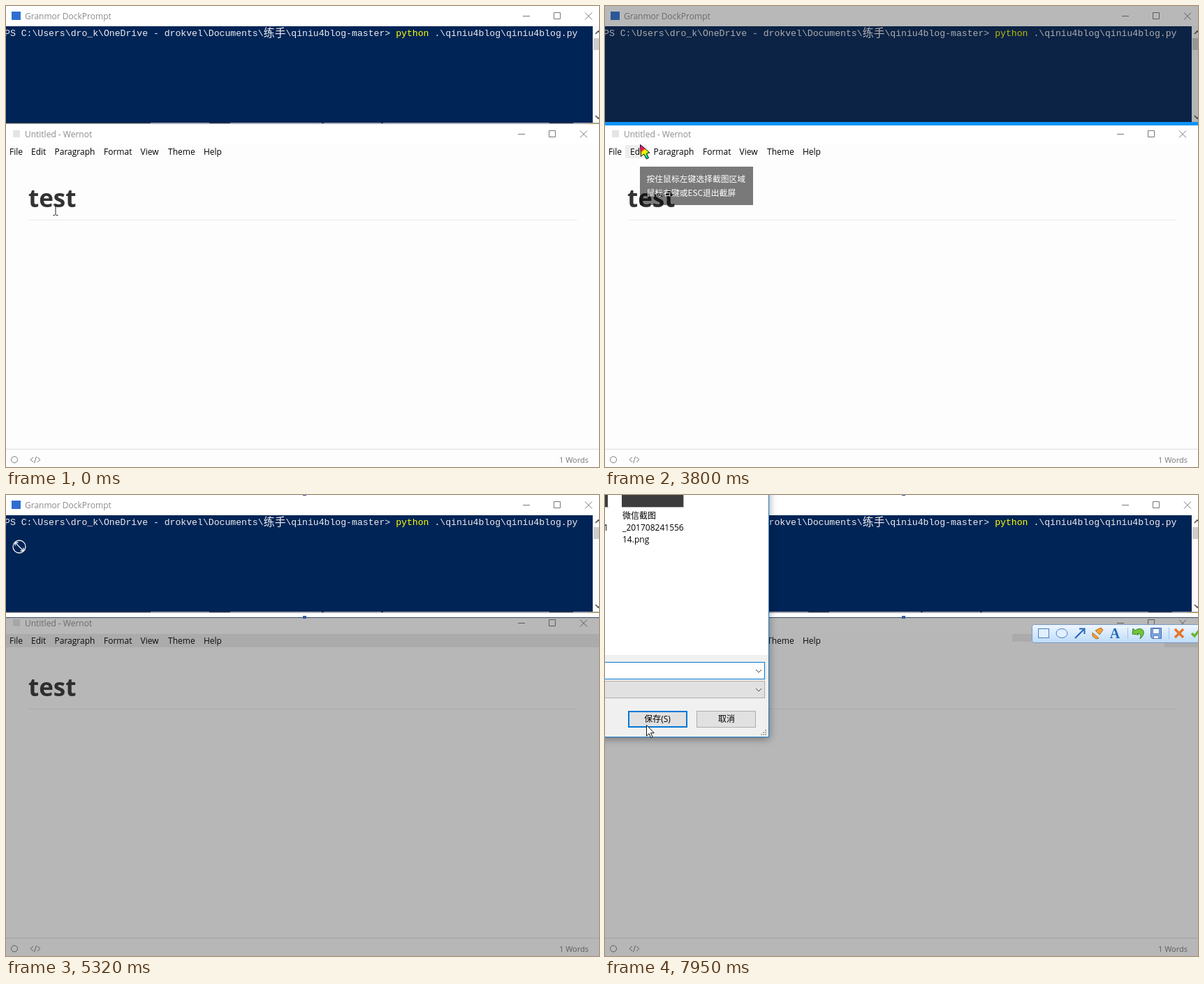
An HTML page for the animation above (8 s loop, 849 by 660 pixels).

```html
<!DOCTYPE html>
<html lang="en">
<head>
<meta charset="utf-8">
<title>Screenshot demo</title>
<style>
  html, body { margin: 0; width: 100%; height: 100%; overflow: hidden; background: #fdfdfd; }
  svg { display: block; }
  text { font: 12px "Open Sans", "Noto Sans CJK SC", sans-serif; white-space: pre; }
  .title { fill: #8c8c8c; }
  .term { font: 13.15px "Liberation Mono", monospace; fill: #eeedf0; }
  .term.cjk { font: 15.8px "Noto Sans CJK SC", sans-serif; font-weight: 300; }
  .term.cmd { fill: #ffff00; }
  .h1 { font-size: 35px; font-weight: 700; fill: #333; }
  .status { font-size: 11px; fill: #777; }
  .tip text { font: 11.8px "Noto Sans CJK SC", sans-serif; fill: #fff; }
  .dim { fill: rgba(35, 35, 35, .32); }
  .line { fill: none; stroke: #777; }
  .blue { fill: #0a93f5; }
  .dialog { filter: drop-shadow(0 2px 6px rgba(0, 0, 0, .4)); }
  .btn { fill: #e1e1e1; stroke: #adadad; }
  .mid { text-anchor: middle; }
</style>
</head>
<body>
<svg width="849" height="660" viewBox="0 0 849 660">
  <defs>
    <linearGradient id="bar" x2="0" y2="1">
      <stop stop-color="#eef6ff"/><stop offset="1" stop-color="#bedcfa"/>
    </linearGradient>
    <linearGradient id="rainbow" x1="0" y1="0" x2=".55" y2="1">
      <stop offset=".1" stop-color="#f0c"/><stop offset=".38" stop-color="#f22"/>
      <stop offset=".5" stop-color="#fe0"/><stop offset=".7" stop-color="#df0"/>
      <stop offset=".9" stop-color="#0d8"/>
    </linearGradient>
    <g id="controls" class="line">
      <path d="M0 .5H10M44.5 -4.5h9v9h-9zM89 -4.5l10 10M99 -4.5l-10 10"/>
    </g>
  </defs>

  <!-- terminal window -->
  <rect width="849" height="169" fill="#fff"/>
  <rect x="8" y="8" width="13" height="12" fill="#2f6fd0"/>
  <text class="title" x="27" y="18.5">Granmor DockPrompt</text>
  <use href="#controls" x="740" y="14"/>
  <rect y="29" width="840" height="138" fill="#012456"/>
  <g id="prompt"></g>
  <rect x="840" y="29" width="9" height="138" fill="#fafafa"/>
  <rect x="841" y="46" width="8" height="17" fill="#cdcdcd"/>
  <path d="M844 40l4-4 4 4M844 157l4 4 4-4" fill="none" stroke="#505050" stroke-width="1.6"/>
  <rect y="167" width="849" height="2" fill="#a5aab2"/>
  <path d="M0 167.5H207M291 167.5h30M452 167.5h3M537 167.5h3M778 167.5h34" stroke="#3b414b"/>
  <path d="M833 168.5h16" stroke="#b49b55"/>

  <!-- editor window -->
  <rect y="169" width="849" height="30" fill="#fff"/>
  <rect x="10" y="178" width="10" height="10" fill="#e4e4e4"/>
  <text class="title" x="27" y="187.5">Untitled - Wernot</text>
  <use href="#controls" x="733" y="183"/>
  <rect data-show="2560 4080" x="29" y="199" width="31" height="19" fill="#eee"/>
  <g id="menu"></g>
  <text class="h1" x="32" y="288">test</text>
  <path d="M32 306.5H818" stroke="#ececec"/>
  <path d="M0 634.5H849" stroke="#dcdcdc"/>
  <circle class="line" cx="12" cy="649.5" r="4.5"/>
  <path class="line" d="M39 646l-4 3.5 4 3.5M45 646l4 3.5-4 3.5M43.500 645l-3 9.500"/>
  <text class="status" x="792" y="654">1 Words</text>

  <!-- capture overlay -->
  <g data-show="3530 4080">
    <rect class="dim" width="849" height="168"/>
    <rect class="blue" y="166" width="849" height="5"/>
  </g>
  <g data-show="4080 8000">
    <rect class="dim" y="176" width="849" height="484"/>
    <rect data-show="4080 6730" y="199" width="849" height="19" fill="rgba(0,0,0,.065)"/>
    <path data-show="6730 8000" d="M583 199h29v11h-29zM801 199h48v19h-48z" fill="rgba(0,0,0,.065)"/>
  </g>
  <path data-show="4080 5040" class="blue" d="M0 0h849v2H0zM0 173h849v5H0z"/>
  <g data-show="5040 8000" fill="#35599a">
    <rect y="175" width="849" height="1" fill="#34496c"/>
    <path d="M425 173h5v4h-5zM425 0h5v1h-5z"/>
  </g>

  <!-- capture toolbar -->
  <g data-show="5460 8000">
    <rect x="611.5" y="185.500" width="245" height="26" rx="3" fill="url(#bar)" stroke="#7c98bd"/>
    <rect data-show="6320 6880" x="778.5" y="187.5" width="22" height="21" rx="2" fill="#c3d3ee" stroke="#8499c4"/>
    <path d="M748.5 190v16M807.5 190v16" stroke="#a5c2e4"/>
    <g fill="#e1efff" stroke="#4a7cc4">
      <rect x="620.5" y="191.500" width="15" height="13"/>
      <ellipse cx="654" cy="198" rx="8" ry="6.5"/>
    </g>
    <path d="M673 205l12-12M679 191.500h7.500v7.500" fill="none" stroke="#2266b8" stroke-width="2"/>
    <path d="M698 197l9 8-4 1-5-4zM702 194l6 6 5-7-3-3z" fill="#f4a136" stroke="#b36a20"/>
    <text class="mid" x="730" y="205" style="font:bold 20px 'Liberation Serif',serif" fill="#2667b4">A</text>
    <path d="M755 199l1-8 3 3c6-5 14-2 12 5q-1 4-5 7 3-8-4-8l2 2z" fill="#74c33b" stroke="#39852a"/>
    <g stroke="#486eae">
      <path d="M781.5 190.500h15v15h-13l-2-2z" fill="#7da5df"/>
      <path d="M784.5 191.500h9v7h-9zM785.5 201.500h7v4h-7z" fill="#f3f8ff" stroke-width=".7"/>
    </g>
    <path d="M816 192l12 12M828 192l-12 12" stroke="#e5752d" stroke-width="3.5"/>
    <path d="M840 198l4 4 8-10" fill="none" stroke="#67b52f" stroke-width="3.5"/>
  </g>

  <!-- save dialog -->
  <g class="dialog" data-show="6730 8000">
    <rect x="-20" y="-20" width="254.500" height="366.500" fill="#fff" stroke="#1979ca"/>
    <rect x="-20" y="229" width="254" height="117" fill="#f0f0f0"/>
    <path d="M0 0h4v17H0zM24 0h88v17H24z" fill="#3c3c3c"/>
    <path d="M0 17.500h5M24 17.500h89M112.500 0v17" stroke="#b5b5b5"/>
    <text x="25" y="34">微信截图</text>
    <text x="25" y="51">_201708241556</text>
    <text x="25" y="68">14.png</text>
    <text x="-2" y="51">1</text>
    <rect x="-5.5" y="239.500" width="234" height="24" fill="#fff" stroke="#0078d7"/>
    <rect class="btn" x="-5.5" y="266.500" width="234" height="24"/>
    <rect data-show="7000 7680" x="-5.5" y="266.500" width="234" height="24" fill="#e5f1fb" stroke="#0078d7"/>
    <path d="M216 250l4 4 4-4M216 277l4 4 4-4" fill="none" stroke="#444"/>
    <rect x="34" y="310" width="83" height="22" fill="#e1e1e1" stroke="#0078d7" stroke-width="2"/>
    <rect class="btn" x="131.500" y="309.500" width="84" height="23"/>
    <text class="mid" x="75" y="325">保存(S)</text>
    <text class="mid" x="174" y="325">取消</text>
    <path d="M229 337h2M226 340h5M223 343h8" stroke="#b0b0b0" stroke-width="2" stroke-dasharray="2 1"/>
  </g>

  <!-- pointers -->
  <g id="pointer">
    <g data-kind="beam">
      <path d="M-3.500 -7.500h2.500l1 1 1-1h2.500M0 -6.500v13M-3.500 7.500h2.500l1-1 1 1h2.500" fill="none" stroke="#222"/>
    </g>
    <path data-kind="arrow" d="M.5 .5v15.500l3.600-3.400 2.800 6 2.300-1-2.700-5.900h4.800z" fill="#fff" stroke="#111"/>
    <g data-kind="rainbow">
      <path d="M.5 .5l1 17 4-3.500 4 7 3-1.500-3-6.500 4.500-1z" fill="url(#rainbow)" stroke="#111"/>
      <g class="tip">
        <rect y="32" width="162" height="55" fill="rgba(0,0,0,.52)"/>
        <text x="9.500" y="54">按住鼠标左键选择截图区域</text>
        <text x="9.500" y="74">鼠标右键或ESC退出截屏</text>
      </g>
    </g>
    <g data-kind="circle" fill="none" stroke="#f4f4f4" stroke-width="1.3">
      <circle r="9"/>
      <path d="M-5.500 -5.500l11 11M-6 -1.500v-4.500h4.500M6 1.500v4.500h-4.500"/>
    </g>
  </g>
</svg>

<script>
const LOOP = 8000;
const $ = id => document.getElementById(id);

function addText(parent, x, y, string, className = '') {
  const node = document.createElementNS(parent.namespaceURI, 'text');
  node.setAttribute('x', x);
  node.setAttribute('y', y);
  node.setAttribute('class', className);
  node.textContent = string;
  parent.append(node);
}

// Terminal runs, placed by column
const column = n => -2 + n * 7.89;
[
  [0, 'PS C:\\Users\\dro_k\\OneDrive - drokvel\\Documents\\', ''],
  [47, '练手', 'cjk'],
  [51, '\\qiniu4blog-master>', ''],
  [71, 'python', 'cmd'],
  [78, '.\\qiniu4blog\\qiniu4blog.py', '']
].forEach(([col, run, kind]) => addText($('prompt'), column(col), kind === 'cjk' ? 44 : 43, run, 'term ' + kind));

Object.entries({ File: 5, Edit: 36, Paragraph: 69.5, Format: 140, View: 192.5, Theme: 232, Help: 283 })
  .forEach(([label, x]) => addText($('menu'), x, 213, label));

// Pointer steps: start time, x, y, and a shape when it changes
const steps = [
  [0, 71, 292, 'beam'], [120, 79, 292], [240, 87, 292],
  [1240, 92, 300], [1370, 107, 317], [1500, 113, 326], [1630, 105, 310],
  [1760, 88, 280], [1890, 70, 250], [2020, 52, 214, 'arrow'], [2150, 36, 184], [2280, 24, 164],
  [2430, 30, 178], [2560, 38, 188], [2690, 45, 196], [2820, 48, 198], [3250, 49, 198],
  [3530, 50, 198, 'rainbow'], [3950, 49, 186], [4080, 46, 165], [4200, 42, 148],
  [4330, 36, 127], [4460, 33, 113], [4610, 28, 98], [4750, 22, 84], [4900, 19, 74],
  [5040, 19, 74, 'circle'], [5760, 70, 84], [5900, 260, 112], [6040, 480, 142],
  [6180, 680, 164], [6320, 783, 198, 'arrow'], [6460, 789, 202],
  [6880, 500, 240], [7000, 170, 274], [7680, 120, 300], [7810, 82, 318], [7950, 59, 329]
];
steps.forEach((step, i) => step[3] ??= steps[i - 1][3]);

const timed = [...document.querySelectorAll('[data-show]')]
  .map(node => [node, ...node.dataset.show.split(' ').map(Number)]);
const shapes = [...document.querySelectorAll('[data-kind]')];
const setVisible = (node, on) => { node.style.display = on ? '' : 'none'; };

function render() {
  const time = performance.now() % LOOP;
  timed.forEach(([node, from, to]) => setVisible(node, time >= from && time < to));
  const [, x, y, kind] = steps.findLast(step => step[0] <= time);
  $('pointer').setAttribute('transform', `translate(${x} ${y})`);
  shapes.forEach(shape => setVisible(shape, shape.dataset.kind === kind));
  requestAnimationFrame(render);
}
render();
</script>
</body>
</html>
```
